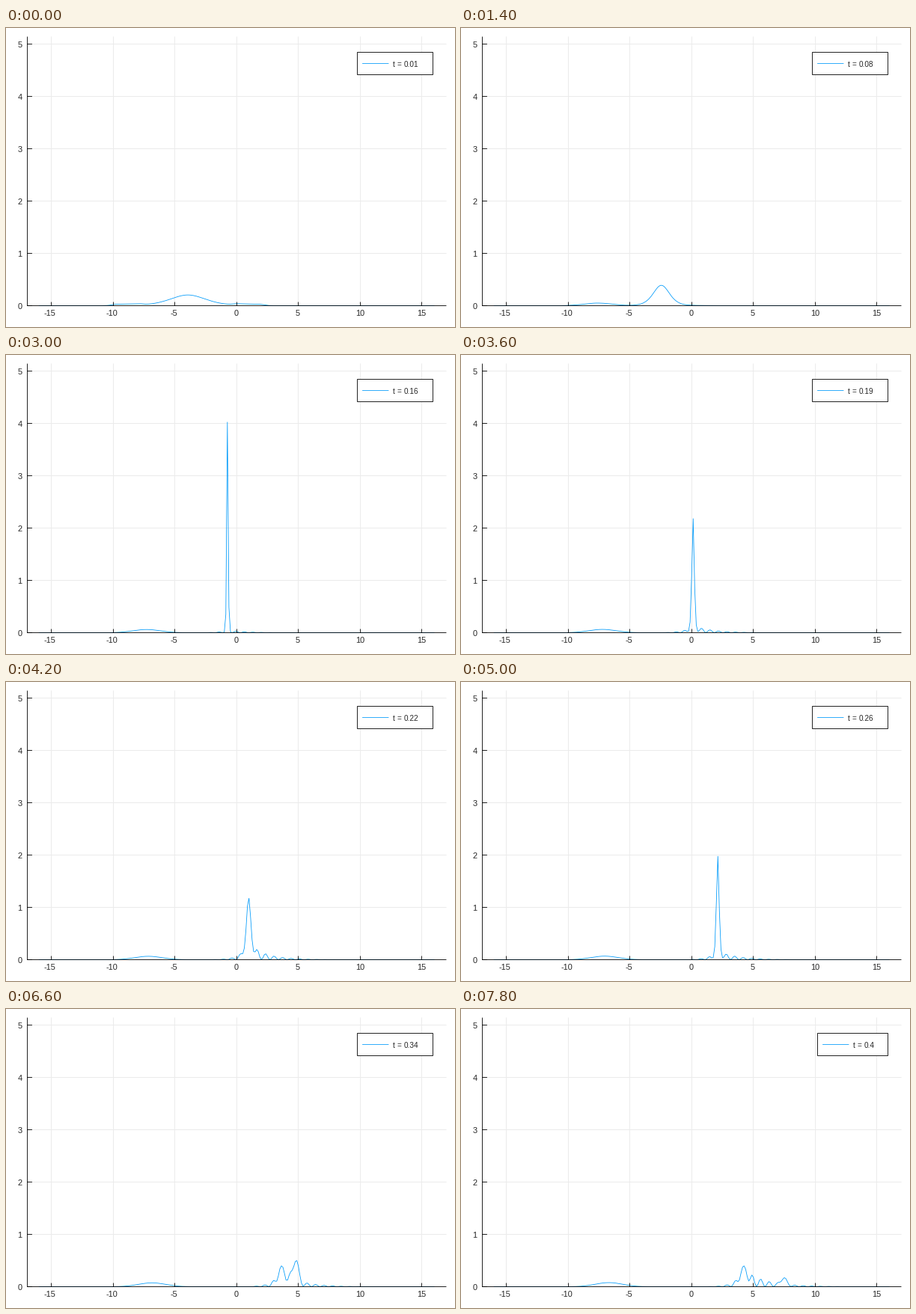
A matplotlib script for the animation above (8 s loop, 600 by 400 pixels).

```python
import numpy as np
import matplotlib.pyplot as plt
from matplotlib.animation import FuncAnimation

W, H, DPI = 600, 400, 100
FRAMES, INTERVAL = 40, 200
LEFT, RIGHT, TOP, BOTTOM = 28.5, 588, 12, 371.5
BLUE, INK, GRID, TEXT = "#009afa", "black", "#ebebeb", "#262626"
PX = 72 / DPI

SPLIT = 0.30      # time at which the pulse breaks in two
RIPPLE = 0.69     # distance between ripples around the pulse

x = np.arange(-16, 16.01, 0.125)


def ramp(t, a, b):
    return np.clip((t - a) / (b - a), 0, 1)


def gauss(c, w):
    return np.exp(-((x - c) / w) ** 2 / 2)


def pulse(t):
    """Centre, height and width: it focuses, breathes, focuses, breaks."""
    centre = np.interp(t, [.01, .16, SPLIT, .40], [-3.95, -.744, 3.261, 4.22])
    times = [.01, .08, .12, .16, .22, SPLIT, .34]
    width = np.exp(np.interp(t, times, np.log([1.95, .88, .5, .069, .235, .0845, .3])))
    mass = .40 - .12 * ramp(t, .01, .16) - .16 * ramp(t, SPLIT, .34)
    return centre, mass / width, width


def density(t):
    c, h, w = pulse(t)
    d = x - c
    y = h / np.cosh(np.clip(d / w, -50, 50)) ** 2

    # flat shoulders at the start, then a slow hump left behind
    start = 1 - ramp(t, .01, .09)
    y += .027 * start / (1 + ((abs(x + 3.95) - 4.9) / 1.3) ** 8)
    y += (.05 + .07 * t) * (1 - start) * gauss(-7.7 + 2.5 * t, 1.1)

    # ripples are strongest while the pulse is wide
    reach = np.where(d < 0, .6, 1.35 + 6 * max(0, t - .34))
    amp = min(.33, .38 / h) * ramp(t, .12, .20)
    y += (amp * np.exp(-abs(d) / reach) * np.cos(np.pi * d / RIPPLE) ** 2
          * (1 - np.exp(-(d / .4) ** 2)))

    # faster fragment thrown out to the right
    s = max(0, t - SPLIT)
    y += ramp(s, 0, .04) * np.exp(-19 * s) * gauss(3.26 + 35 * s * (1 + 2 * s), .22)
    return y


def px(v):
    return 308.2 + 16.5 * v


def py(v):
    return BOTTOM - 70 * v


fig = plt.figure(figsize=(W / DPI, H / DPI), dpi=DPI, facecolor="white")
ax = fig.add_axes([0, 0, 1, 1])
ax.set_xlim(0, W)
ax.set_ylim(H, 0)
ax.axis("off")


def stroke(xs, ys, color=INK, z=4, lw=.85):
    return ax.plot(xs, ys, color=color, lw=lw * PX, zorder=z, snap=False,
                   solid_capstyle="projecting", solid_joinstyle="miter")[0]


def label(lx, ly, text, ha, size=11):
    return ax.text(lx, ly, text, ha=ha, va="baseline", color=TEXT, zorder=6,
                   family="Liberation Sans", fontsize=size * PX)


for v in range(-15, 16, 5):
    gx = np.floor(px(v)) + .5
    stroke([gx, gx], [TOP, BOTTOM], GRID, 1, 1)
    stroke([gx, gx], [BOTTOM - 4.5, BOTTOM])
    label(gx - (1.6 if v < 0 else .7), 385, str(v), "center")
for v in range(6):
    gy = py(v)
    stroke([LEFT, RIGHT], [gy, gy], GRID, 1, 1)
    stroke([LEFT, LEFT + 6], [gy, gy])
    label(21.5, gy + 4.2, str(v), "right")
stroke([LEFT, LEFT], [TOP, BOTTOM])
stroke([LEFT, RIGHT], [BOTTOM, BOTTOM])

curve = stroke(px(x), py(0 * x), BLUE, 3, .8)
box = ax.fill([0], [0], fc="white", ec=INK, lw=.85 * PX, zorder=4, snap=False)[0]
sample = stroke([0, 1], [47.5, 47.5], BLUE, 5, .8)
legend = [label(0, 52, s, "left", 10) for s in ("t", "=", "")]


def draw(i):
    t = (i + 1) / 100
    value = f"{t:g}"
    curve.set_ydata(py(density(t)))
    left = 476.5 if len(value) == 3 else 469.5
    box.set_xy([(left, 32.5), (570.5, 32.5), (570.5, 62.5), (left, 62.5)])
    sample.set_xdata([left + 7, left + 41.5])
    for part, dx in zip(legend, (47.5, 53.5, 62.3)):
        part.set_x(left + dx)
    legend[2].set_text(value)
    return curve, box, sample, *legend


anim = FuncAnimation(fig, draw, frames=FRAMES, interval=INTERVAL,
                     repeat=True, repeat_delay=0, blit=False)
plt.show()
```
